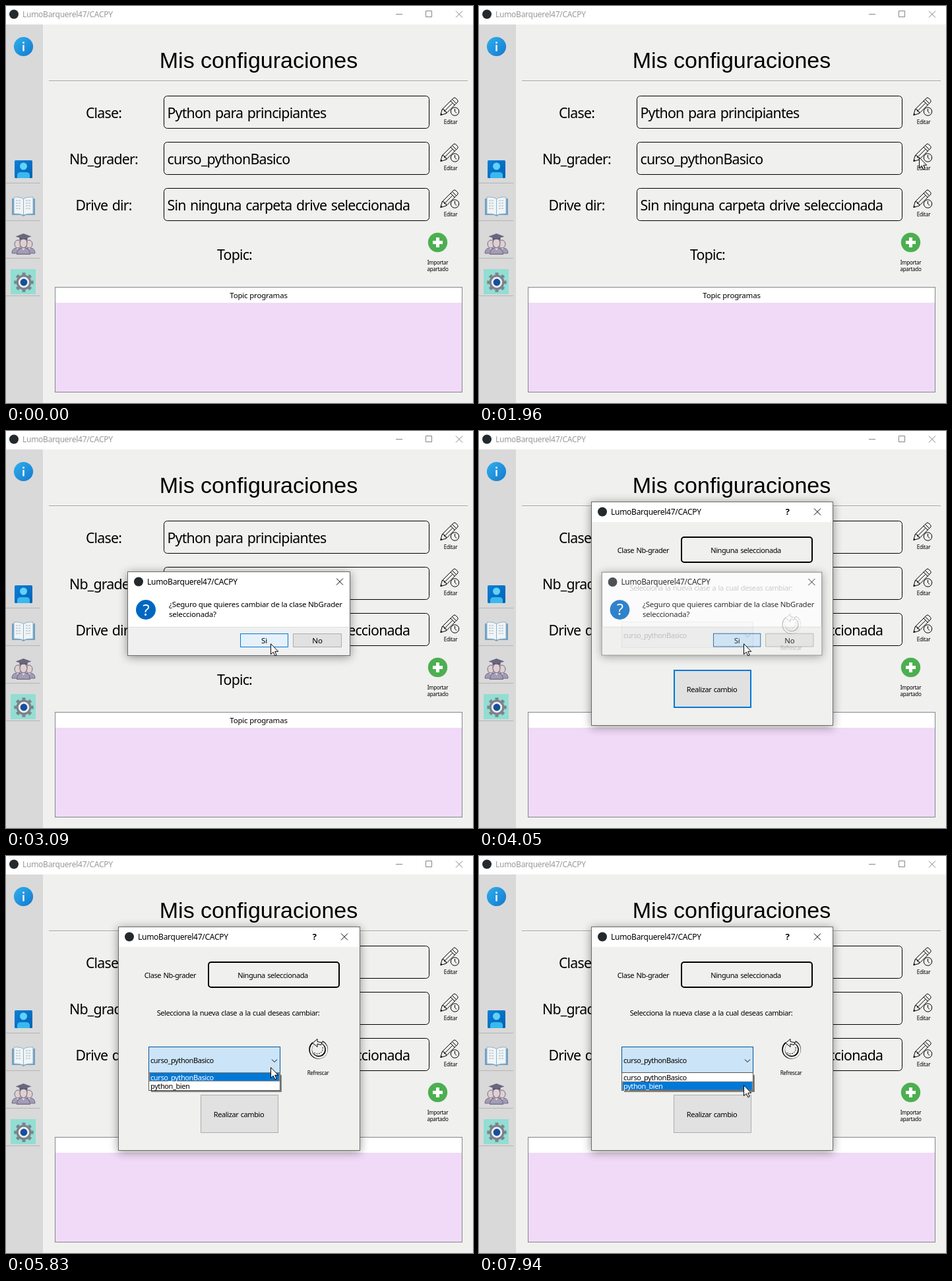
These frames come from a looping animation (708 px wide and 602 px high, 8 s). An HTML page:

```html
<!DOCTYPE html>
<html lang="es">
<head>
<meta charset="utf-8">
<title>Mis configuraciones</title>
<style>
  html, body { margin: 0; width: 100%; height: 100%; overflow: hidden; background: #f0f0ee; }
  svg { display: block; width: 708px; height: 602px; }
  text { font: 11px "Noto Sans", "Open Sans", sans-serif; letter-spacing: -.037em; word-spacing: .08em; }
  .ui { font-size: 11.5px; letter-spacing: -.2px; word-spacing: 0; }
  .caption { font-size: 12px; letter-spacing: -.27px; }
  .big { font-size: 21.33px; }
  .tiny { font-size: 8px; }
  .mid { text-anchor: middle; }
  .heading { font: 34px "Liberation Sans", Arial, sans-serif; letter-spacing: 0; word-spacing: 0; }
  .window { filter: drop-shadow(0 2px 7px rgba(0, 0, 0, .42)); }
  .line { fill: none; stroke: #000; }
</style>
</head>
<body>
<svg viewBox="0 0 708 602">
  <defs>
    <linearGradient id="infoBlue" x2="1" y2="1">
      <stop stop-color="#2fb0ec"/><stop offset="1" stop-color="#1478cf"/>
    </linearGradient>
    <linearGradient id="userBlue" x2="1" y2="1">
      <stop stop-color="#0d7fd6"/><stop offset="1" stop-color="#0062b4"/>
    </linearGradient>
    <clipPath id="listClip"><rect id="listReveal" x="216" y="328" width="206" height="34"/></clipPath>

    <g id="edit">
      <g class="line" stroke-linejoin="round">
        <path d="M658.800 165.500l2.400-8.700 17-17q1.800-1.800 3.600 0l2.600 2.600q1.800 1.800 0 3.600l-17 17z"/>
        <path d="M661.200 156.800l3 .200.500 2.500 2.500.500.200 3M664.700 159.500l12-12M674 144l6.300 6.300M676.500 141.500l6.300 6.300"/>
        <circle cx="680.500" cy="160" r="6.200" fill="#f0f0ee"/>
        <path d="M680.500 156v4l2.600 2.500"/>
      </g>
      <path d="M658.800 165.500l.800-3 2.200 2.200z"/>
      <text class="tiny mid" x="674" y="179">Editar</text>
    </g>

    <g id="student" stroke="#716b82">
      <path d="M-9 17q0-7 6-8h6q6 1 6 8z" fill="#a49cb6"/>
      <path d="M-3 8h6l-3 4z" fill="#e9e4ec" stroke="none"/>
      <ellipse cy="3" rx="5" ry="6" fill="#dfcfd0"/>
    </g>
  </defs>

  <!-- main window -->
  <rect width="708" height="602" fill="#f0f0ee"/>
  <rect width="708" height="28" fill="#fff"/>
  <circle cx="12" cy="12.500" r="7" fill="#24292e"/>
  <text id="mainTitle" class="caption" x="25" y="17">LumoBarquerel47/CACPY</text>
  <path id="controls" fill="none" d="M591 12.500h10M636.500 7.500h9v9h-9zM682 7.500l10 10M692 7.500l-10 10"/>

  <!-- sidebar -->
  <rect y="28" width="56" height="574" fill="#d9d9d9"/>
  <path d="M0 268.500h52M0 325.500h52M0 382.500h52M0 439.500h52" stroke="#b4b4b4"/>
  <circle cx="26.500" cy="61.500" r="14.600" fill="url(#infoBlue)"/>
  <circle cx="26.500" cy="55.500" r="1.500" fill="#fff"/>
  <path d="M26.500 59v9.500" stroke="#fff" stroke-width="2.400"/>
  <rect x="13" y="234" width="27" height="27" rx="1.500" fill="url(#userBlue)"/>
  <circle cx="26.500" cy="243" r="5.500" fill="#62d2f8"/>
  <path d="M17 261v-4q0-5 5-5h9q5 0 5 5v4z" fill="#39b9ef"/>
  <path d="M9 292h35v25H30l-3.500 2-3.500-2H9z" fill="#6f9fc4"/>
  <path d="M12 290q9-1 14.500 2.500Q32 289 41 290v25q-9-.5-14.500 2Q21 314.500 12 315z" fill="#f1f5f7" stroke="#8fb0c6"/>
  <path d="M26.500 292.500V317" stroke="#8fb0c6"/>
  <path d="M15 295h8M15 299h8M15 303h8M15 307h8M30 295h8M30 299h8M30 303h8M30 307h8" stroke="#9db2bf" stroke-dasharray="3 1"/>
  <use href="#student" transform="translate(18 358)"/>
  <use href="#student" transform="translate(35 358)"/>
  <use href="#student" transform="translate(26.500 356) scale(1.100 1.200)"/>
  <path d="M20.500 355v-4h12v4q-6-2.500-12 0z" fill="#57536a"/>
  <path d="M14.500 349.500l12-4.500 12 4.500-12 4z" fill="#6a667d"/>
  <rect x="7" y="399" width="38" height="38" fill="#92ded3"/>
  <circle cx="27" cy="419" r="11.500" fill="#7d828b"/>
  <circle cx="27" cy="419" r="12.500" fill="none" stroke="#7d828b" stroke-width="4.400" pathLength="80" stroke-dasharray="5 5" stroke-dashoffset="2.500"/>
  <circle cx="27" cy="419" r="6.800" fill="#174f9d" stroke="#eef1f3" stroke-width="2.800"/>

  <!-- settings form -->
  <text class="heading mid" x="383" y="94">Mis configuraciones</text>
  <path d="M65 113.500h635" stroke="#a0a0a0"/>
  <path d="M65 114.500h635" stroke="#fff"/>
  <g id="fields"></g>
  <text class="big mid" x="346.500" y="385">Topic:</text>
  <circle cx="654.500" cy="358.500" r="14.700" fill="#4caf50"/>
  <path d="M647 358.500h15M654.500 351v15" stroke="#fff" stroke-width="5"/>
  <text class="tiny mid" x="654.500" y="392">Importar</text>
  <text class="tiny mid" x="654.500" y="402">apartado</text>
  <rect x="74.500" y="426.500" width="617" height="159" fill="#f0daf7"/>
  <rect x="75" y="427" width="616" height="23" fill="#fff"/>
  <rect x="74.500" y="426.500" width="617" height="159" fill="none" stroke="#828790"/>
  <text class="ui mid" x="383" y="443">Topic programas</text>

  <!-- class picker -->
  <g id="picker" class="window">
    <rect x="170.500" y="107.500" width="366" height="339" fill="#f0f0ee" stroke="#6b6b6b"/>
    <rect x="171" y="108" width="365" height="30" fill="#fff"/>
    <circle cx="187" cy="122.500" r="7" fill="#24292e"/>
    <text class="caption" x="200" y="127">LumoBarquerel47/CACPY</text>
    <text class="mid" x="467.500" y="127" style="font-size:13px;font-weight:600">?</text>
    <path class="line" d="M508 117.500l10 10M518 117.500l-10 10"/>
    <text class="mid" x="249" y="185">Clase Nb-grader</text>
    <rect class="line" x="307" y="161" width="198" height="38" rx="4" stroke-width="2"/>
    <text class="mid" x="404.500" y="185">Ninguna seleccionada</text>
    <text class="mid" x="352" y="242">Selecciona la nueva clase a la cual deseas cambiar:</text>
    <rect id="combo" x="216.500" y="289.500" width="199" height="39"/>
    <text x="219" y="314">curso_pythonBasico</text>
    <path class="line" stroke="#444" d="M403 308.500l4 4 4-4"/>
    <g fill="none">
      <path d="M479 282.500a12 12 0 1 1-13 1.500" stroke="#000" stroke-width="4.800"/>
      <path d="M479.500 283a12 12 0 1 1-13 1.700" stroke="#f0f0ee" stroke-width="2.800"/>
      <path d="M480 290a8 8 0 0 1-13 8" stroke="#000" stroke-dasharray="2 1.500"/>
      <path d="M472 277.500v4l7 1.500-1.500 3.500-5.500-1.500v4.500l-7-6z" fill="#f0f0ee" stroke="#000" stroke-linejoin="round"/>
    </g>
    <text class="tiny mid" x="473" y="332">Refrescar</text>
    <rect id="apply" fill="#e1e1e1"/>
    <text class="mid" x="353" y="396">Realizar cambio</text>
  </g>
  <g id="list" clip-path="url(#listClip)">
    <rect x="220" y="332" width="198" height="26" fill="#000" opacity=".45"/>
    <rect x="216.500" y="328.500" width="199" height="27" fill="#fff" stroke="#555"/>
    <rect id="rowMark" x="217.500" width="197" height="13" fill="#0078d7" stroke="#ff8728" stroke-dasharray="1 1"/>
    <text id="row0" x="219" y="340">curso_pythonBasico</text>
    <text id="row1" x="219" y="353">python_bien</text>
  </g>

  <!-- confirmation -->
  <g id="confirm" class="window">
    <rect x="184.500" y="213.500" width="337" height="127" fill="#fff" stroke="#6b6b6b"/>
    <rect x="185" y="297" width="336" height="43" fill="#f0f0f0"/>
    <path d="M185 297.500h336" stroke="#dfdfdf"/>
    <circle cx="201" cy="228.500" r="7" fill="#24292e"/>
    <text class="caption" x="214" y="233">LumoBarquerel47/CACPY</text>
    <path class="line" d="M501 223.500l10 10M511 223.500l-10 10"/>
    <circle cx="212" cy="271" r="15" fill="#0067c0"/>
    <text class="mid" x="212" y="279.500" fill="#fff" style="font-size:24px;font-weight:500">?</text>
    <text class="ui" x="247" y="267">¿Seguro que quieres cambiar de la clase NbGrader</text>
    <text class="ui" x="247" y="282">seleccionada?</text>
    <rect id="yes"/>
    <text class="ui mid" x="391.500" y="322">Si</text>
    <rect x="435.500" y="307.500" width="73" height="20" fill="#e1e1e1" stroke="#adadad"/>
    <text class="ui mid" x="472" y="322">No</text>
  </g>

  <path id="cursor" d="M.5.700v16l3.700-3.500 2.600 5.600 2.400-1-2.500-5.500h5z" fill="#fff" stroke="#000"/>
</svg>
<script>
const LOOP = 8000;
const $ = id => document.getElementById(id);
const set = (id, attrs) => {
  for (const name in attrs) $(id).setAttribute(name, attrs[name]);
};
const show = (id, on) => set(id, { visibility: on ? "visible" : "hidden" });
const ramp = (t, from, to) => Math.min(1, Math.max(0, (t - from) / (to - from)));
const ease = u => u * u * (3 - 2 * u);

const fields = [
  ["Clase:", "Python para principiantes"],
  ["Nb_grader:", "curso_pythonBasico"],
  ["Drive dir:", "Sin ninguna carpeta drive seleccionada"]
];
$("fields").innerHTML = fields.map(([label, value], i) => `
  <g transform="translate(0 ${70 * i})">
    <text class="big mid" x="148" y="170">${label}</text>
    <rect class="line" x="239.500" y="136.500" width="402" height="49" rx="5"/>
    <text class="big" x="244.500" y="170">${value}</text>
    <use href="#edit"/>
  </g>`).join("");

// time, x, y of the pointer tip
const path = [
  [480, 690, 603], [870, 647, 300], [1210, 647, 300], [1590, 675, 207],
  [1680, 675, 207], [1950, 667, 229], [2490, 667, 229], [3090, 401, 322],
  [5110, 401, 322], [5230, 401, 320], [6700, 401, 320], [7020, 401, 324],
  [7160, 401, 324], [7940, 401, 347]
];

function pointer(t) {
  const next = path.findIndex(key => key[0] > t);
  if (next < 0) return path[path.length - 1].slice(1);
  if (next === 0) return path[0].slice(1);
  const [a, b] = [path[next - 1], path[next]];
  const u = ease(ramp(t, a[0], b[0]));
  return [1, 2].map(k => Math.round(a[k] + (b[k] - a[k]) * u));
}

// a two-pixel blue frame marks the default button
function drawButton(id, x, y, w, h, fill, stroke, thick) {
  const inset = thick / 2;
  set(id, { x: x + inset, y: y + inset, width: w - thick, height: h - thick, fill, stroke, "stroke-width": thick });
}

function draw(t) {
  const [x, y] = pointer(t);
  show("cursor", t >= 540);
  set("cursor", { transform: `translate(${x} ${y})` });

  const active = t >= 2030 && t < 2150;
  set("mainTitle", { fill: active ? "#000" : "#999" });
  set("controls", { stroke: active ? "#000" : "#858585" });

  const opacity = t < 3900 ? ramp(t, 2120, 2225) : 1 - ramp(t, 4000, 4250);
  const scale = 1 - .05 * (1 - opacity);
  show("confirm", opacity > 0);
  set("confirm", { opacity, transform: `translate(353 277) scale(${scale}) translate(-353 -277)` });
  const over = x >= 355 && x < 428 && y >= 307 && y < 328;
  if (t >= 3770) drawButton("yes", 355, 307, 73, 21, "#cce4f7", "#005499", 1);
  else if (over) drawButton("yes", 355, 307, 73, 21, "#e5f1fb", "#0078d7", 1);
  else drawButton("yes", 355, 307, 73, 21, "#e1e1e1", "#0078d7", 2);

  show("picker", t > 3880);
  set("picker", { opacity: ramp(t, 3880, 4050) });
  const opened = t >= 5630;
  const hover = t >= 4200;
  set("combo", {
    fill: opened ? "#cce4f7" : hover ? "#e5f1fb" : "#e1e1e1",
    stroke: opened ? "#005499" : hover ? "#0078d7" : "#adadad"
  });
  drawButton("apply", 295, 362, 118, 58, "#e1e1e1", opened ? "#adadad" : "#0078d7", opened ? 1 : 2);

  const row = y >= 342 ? 1 : 0;
  show("list", t >= 5670);
  set("listReveal", { height: 34 * ramp(t, 5650, 5830) });
  set("rowMark", { y: 328.5 + 13.5 * row });
  set("row0", { fill: row ? "#000" : "#fff" });
  set("row1", { fill: row ? "#fff" : "#000" });
}

function tick() {
  draw(performance.now() % LOOP);
  requestAnimationFrame(tick);
}
tick();
</script>
</body>
</html>
```
